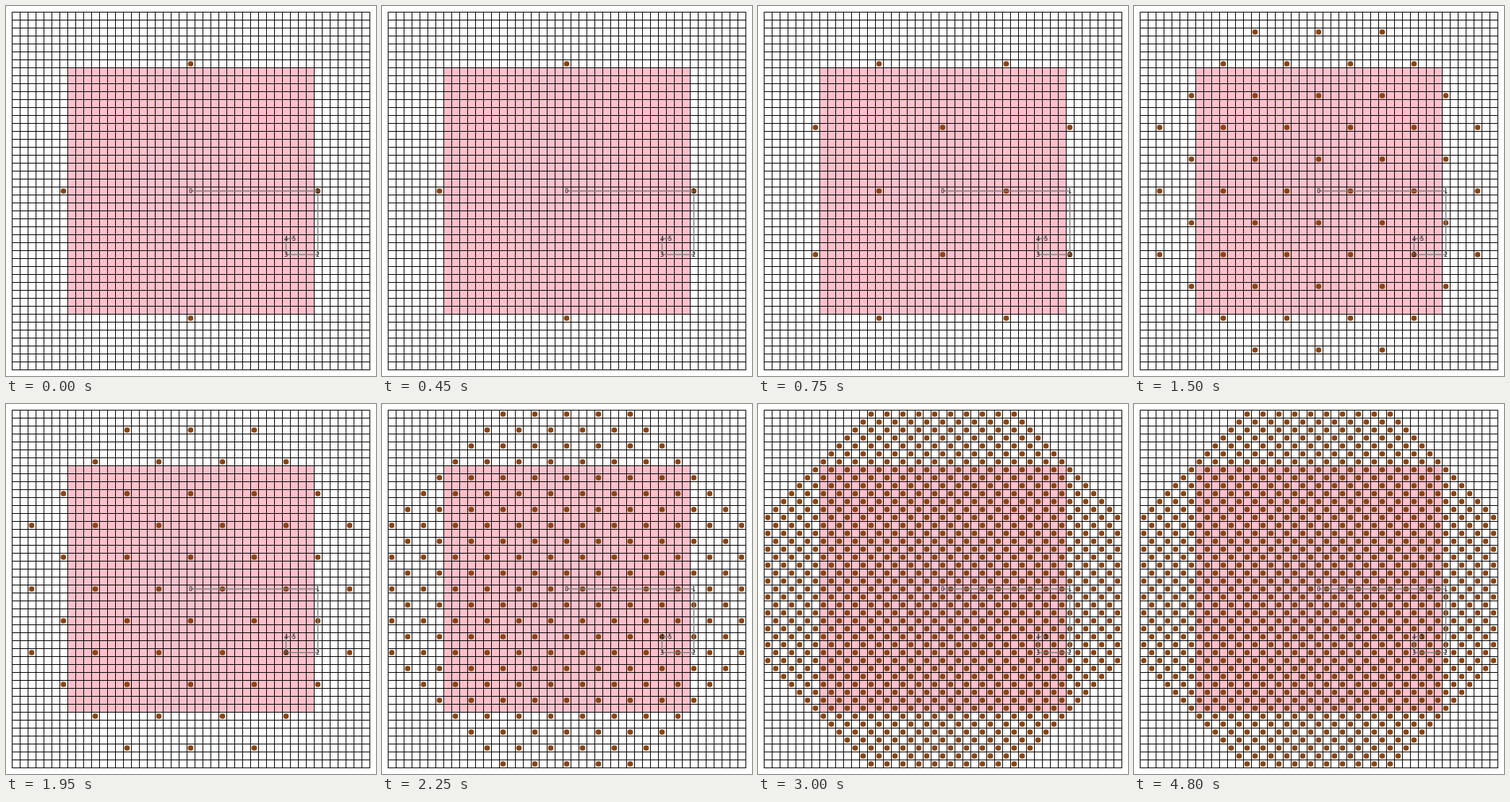
An HTML page that plays this animation: 512x512 px, repeating every 6000 ms.

```html
<!DOCTYPE html>
<html lang="en">
<head>
<meta charset="utf-8">
<title>Lattice refinement</title>
<style>
  html, body { margin: 0; width: 100%; height: 100%; overflow: hidden; background: #fff; }
  svg { display: block; width: 100vw; height: 100vh; }
  text { font: 8px "DejaVu Sans", sans-serif; text-anchor: middle; fill: #111; }
</style>
</head>
<body>
<svg viewBox="0 0 512 512">
  <rect x="85.5" y="85.5" width="341" height="341" fill="#ffc0cb"/>
  <path id="grid" stroke="#000" stroke-width="1"/>
  <g id="dots" fill="#8b4513"></g>
  <path id="spiral" fill="none" stroke="#808080" stroke-width="1.6"/>
  <g id="labels"></g>
</svg>
<script>
const CELL = 11, CELLS = 45, EDGE = 8.5, HALF = 22;
const LOOP = 6000, STEP = 750, LEVELS = 5;
const byId = id => document.getElementById(id);
const px = i => 255.5 + i * CELL;
const py = j => 256 + j * CELL;

function add(parent, tag, attrs) {
  const el = document.createElementNS("http://www.w3.org/2000/svg", tag);
  for (const key in attrs) el.setAttribute(key, attrs[key]);
  return parent.appendChild(el);
}

function drawGrid() {
  const end = EDGE + CELLS * CELL;
  let d = "";
  for (let k = 0; k <= CELLS; k++) {
    const p = EDGE + k * CELL;
    d += `M${p} ${EDGE - 0.5}V${end + 0.5}M${EDGE - 0.5} ${p}H${end + 0.5}`;
  }
  byId("grid").setAttribute("d", d);
}

// Each leg turns a quarter; its length halves from 16 cells down to 1.
function drawSpiral() {
  const corners = [[0, 0], [16, 0], [16, 8], [12, 8], [12, 6], [13, 6]];
  byId("spiral").setAttribute("d", "M" + corners.map(([i, j]) => `${px(i)} ${py(j)}`).join("L"));
  corners.forEach(([i, j], n) => {
    add(byId("labels"), "text", { x: px(i), y: py(j) + 3 }).textContent = n;
  });
}

// Odd lattice points inside a diamond, clipped to the board.
function makeLevel(level) {
  const group = add(byId("dots"), "g", {});
  const gap = 16 >> level;
  const reach = 2 ** (level + 1) - 1;
  const max = Math.floor(HALF / gap);
  for (let j = -max; j <= max; j++) {
    for (let i = -max; i <= max; i++) {
      const odd = (i + j) % 2 !== 0;
      if (odd && Math.abs(i) + Math.abs(j) <= reach) {
        add(group, "circle", { cx: px(i * gap), cy: py(j * gap), r: 3.8 });
      }
    }
  }
  return group;
}

drawGrid();
drawSpiral();
const levels = Array.from({ length: LEVELS }, (_, n) => makeLevel(n));

function render(time) {
  const current = Math.min(LEVELS - 1, Math.floor((time % LOOP) / STEP));
  levels.forEach((group, n) => group.setAttribute("display", n === current ? "inline" : "none"));
}

function tick() {
  render(performance.now());
  requestAnimationFrame(tick);
}
tick();
</script>
</body>
</html>
```
